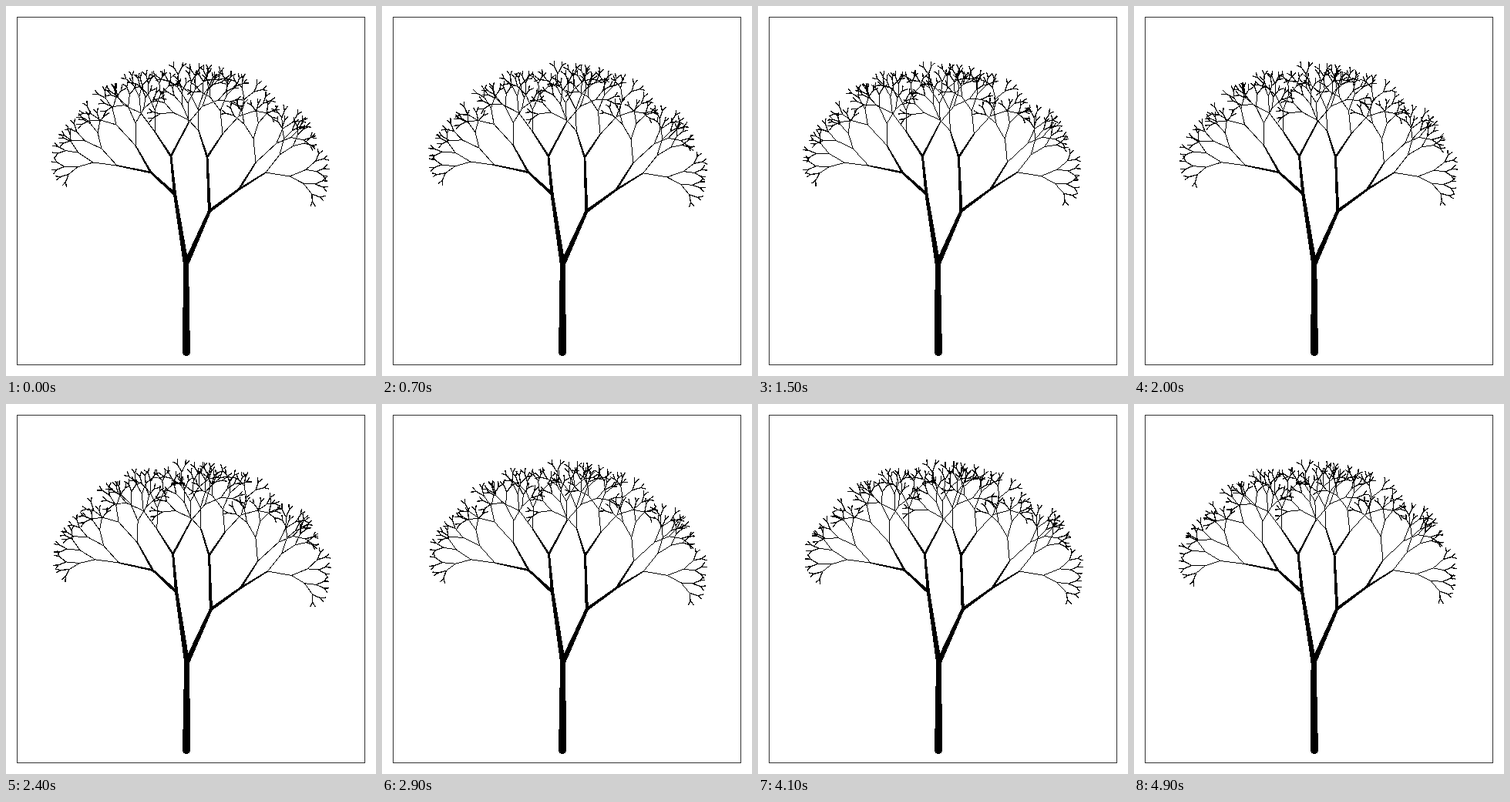
Recreate the animation shown at these times as an HTML page. Size 480 by 480 pixels, loop 5000 ms.

```html
<!DOCTYPE html>
<html lang="en">
<head>
<meta charset="utf-8">
<title>Swaying tree</title>
<style>
  html, body { margin: 0; width: 100%; height: 100%; overflow: hidden; background: #fff; }
  svg { display: block; width: 100vw; height: 100vh; }
  path { shape-rendering: crispEdges; }
</style>
</head>
<body>
<svg viewBox="0 0 480 480">
  <rect width="480" height="480" fill="#fff"/>
  <rect x="14.5" y="14.5" width="451" height="451" fill="none" stroke="#333" shape-rendering="crispEdges"/>
  <g id="tree">
    <path id="limbs" fill="#000"/>
    <path id="branches" fill="none" stroke="#000" stroke-width="1"/>
    <path id="twigs" fill="none" stroke="#000" stroke-width="1.3"/>
  </g>
</svg>
<script>
  const LOOP = 5000, STEP = 100, TAU = Math.PI * 2, DEG = Math.PI / 180;
  const BASE = [234, 449];
  const LAST_DEPTH = 8;

  // Ends of the main limbs; limb i forks into limbs 2i and 2i + 1.
  const JOINTS = [
    BASE,
    [233.5, 335],
    [219, 244], [264, 266],
    [188, 216], [214, 195], [261, 196], [302, 238],
    [144, 207], [168, 181], [193, 163], [237, 151],
    [250, 162], [281, 166], [324, 203], [337, 216],
    [113, 203], [124, 185], [143, 154], [168, 152],
    [175, 139], [193, 135], [236, 126], [255, 130],
    [237, 148], [249, 134], [278, 136], [302, 143],
    [321, 172], [351, 178], [355, 193], [368, 221]
  ];
  const WIDTHS = [10, 7, 4.2, 2.8, 1.6];
  const LENGTHS = { 5: 22, 6: 16, 7: 10.5, 8: 7 };
  const SPREAD = 26;

  const el = id => document.getElementById(id);
  const tree = el("tree"), limbs = el("limbs"), branches = el("branches"), twigs = el("twigs");

  const rand = n => {
    const v = Math.sin(n * 12.9898) * 43758.5453;
    return v - Math.floor(v);
  };
  const pt = (x, y) => x.toFixed(2) + " " + y.toFixed(2);
  const line = (a, b) => "M" + pt(...a) + "L" + pt(...b);

  // Tapered limb with round ends, always wound clockwise.
  function taper(a, b, wa, wb) {
    const dx = b[0] - a[0], dy = b[1] - a[1], len = Math.hypot(dx, dy);
    const nx = dy / len, ny = -dx / len, ra = wa / 2, rb = wb / 2;
    return "M" + pt(a[0] + nx * ra, a[1] + ny * ra) +
      "L" + pt(b[0] + nx * rb, b[1] + ny * rb) +
      `A${rb} ${rb} 0 0 1 ` + pt(b[0] - nx * rb, b[1] - ny * rb) +
      "L" + pt(a[0] - nx * ra, a[1] - ny * ra) +
      `A${ra} ${ra} 0 0 1 ` + pt(a[0] + nx * ra, a[1] + ny * ra) + "Z";
  }

  function sway(p) {
    return Math.sin(TAU * (9 * p - 0.06)) - 0.25 * Math.cos(TAU * (p - 0.14));
  }

  function flutter(i, depth, p) {
    const rate = 4 + Math.floor(rand(i + 0.7) * 9);
    const phase = rand(i + 0.3);
    return 0.007 * depth * Math.sin(TAU * (rate * p + phase));
  }

  function render(ms) {
    const p = Math.floor((ms % LOOP) / STEP) * STEP / LOOP;
    let thick = "", thin = "", tips = "";

    function grow(i, depth, from, heading) {
      let to;
      if (depth < 5) {
        to = JOINTS[i];
        heading = Math.atan2(to[0] - from[0], from[1] - to[1]);
      } else {
        const side = i % 2 ? 1 : -1;
        heading += side * (SPREAD + 14 * (rand(i) - 0.5)) * DEG + flutter(i, depth, p);
        const len = LENGTHS[depth] * (0.9 + 0.2 * rand(i + 0.5));
        to = [from[0] + len * Math.sin(heading), from[1] - len * Math.cos(heading)];
      }
      if (depth < 4) thick += taper(from, to, WIDTHS[depth], WIDTHS[depth + 1]);
      else if (depth < 7) thin += line(from, to);
      else tips += line(from, to);

      if (depth < LAST_DEPTH) {
        grow(2 * i, depth + 1, to, heading);
        grow(2 * i + 1, depth + 1, to, heading);
      }
    }

    grow(1, 0, BASE, 0);
    limbs.setAttribute("d", thick);
    branches.setAttribute("d", thin);
    twigs.setAttribute("d", tips);
    const lean = 0.355 * (sway(p) - sway(0));
    tree.setAttribute("transform", `rotate(${lean.toFixed(4)} ${BASE[0]} ${BASE[1]})`);
  }

  const start = performance.now();
  function tick() {
    render(performance.now() - start);
    requestAnimationFrame(tick);
  }
  render(0);
  requestAnimationFrame(tick);
</script>
</body>
</html>
```
